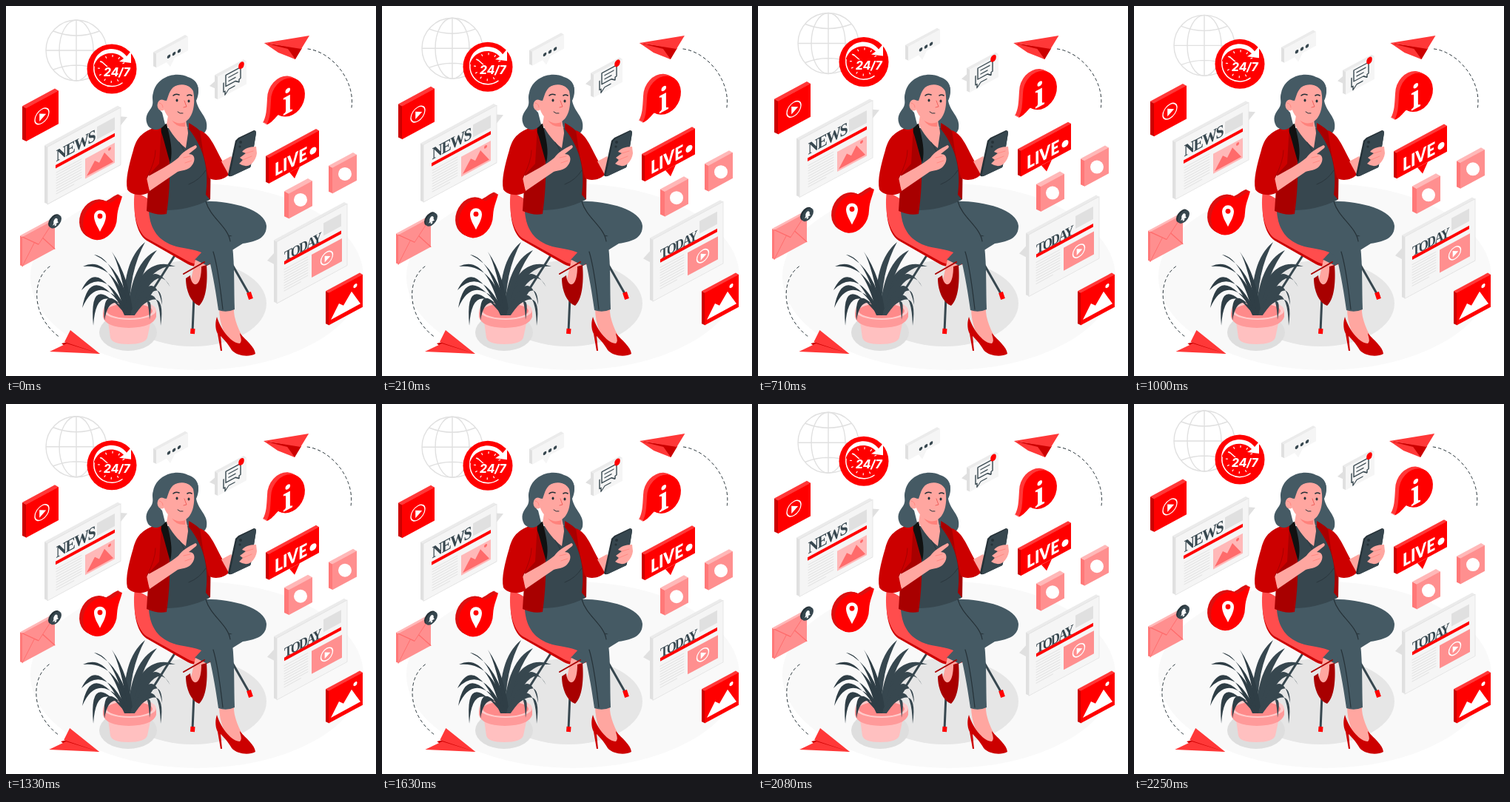
These frames come from a looping animation (500 by 500 pixels, 2290 ms). An HTML page:

```html
<!DOCTYPE html>
<html lang="en">
<head>
<meta charset="utf-8">
<style>
html, body { margin: 0; width: 100%; height: 100%; overflow: hidden; background: #fff; }
svg { display: block; width: 100vw; height: 100vh; }
</style>
</head>
<body>
<svg id="stage" viewBox="0 0 500 500"></svg>
<script>
const RED = '#f00', CHERRY = '#cc0000', DEEP = '#a80000', LIGHT = '#ff3838';
const PINK = '#ff8f8f', PALE = '#ffb8b8', ROSE = '#ff6b6b', SKIN = '#ffa6a0', BLUSH = '#ff827c';
const DARK = '#37474f', SLATE = '#455a64', INK = '#263238';
const WHITE = '#fff', MIST = '#f5f5f5', GREY = '#e0e0e0';
const SLOPE = .54;

const path = (fill, d) => `<path fill="${fill}" d="${d}"/>`;
const line = (color, width, d, extra = '') =>
  `<path fill="none" stroke="${color}" stroke-width="${width}" stroke-linecap="round" stroke-linejoin="round" ${extra} d="${d}"/>`;
const oval = (fill, x, y, rx, ry = rx) => `<ellipse fill="${fill}" cx="${x}" cy="${y}" rx="${rx}" ry="${ry}"/>`;
const move = (x, y, content) => `<g transform="translate(${x} ${y})">${content}</g>`;
const skew = (x, y, content) => `<g transform="matrix(1 ${-SLOPE} 0 1 ${x} ${y})">${content}</g>`;
const group = (name, content) => `<g class="${name}">${content}</g>`;
const word = (x, y, style, text) =>
  `<text transform="matrix(.866 ${-.866 * SLOPE} 0 1 ${x} ${y})" style="font:${style}">${text}</text>`;

// Upright slab seen at an angle; inner parts use the face's own coordinates.
function box(x, y, w, h, depth, [face, left, top], inner = '') {
  const lift = -2 * SLOPE * depth;
  return skew(x, y,
    path(left, `M.3 0L${-depth} ${lift}V${h + lift}L.3 ${h}Z`) +
    path(top, `M0 .3L${-depth} ${lift}H${w - depth}L${w} .3Z`) +
    path(face, `M0 0H${w}V${h}H0Z`) + inner);
}

function extrude(shape, depth, color) {
  let layers = '';
  for (let i = depth; i > 0; i--) layers += move(-i, -i * SLOPE, path(color, shape));
  return layers + path(RED, shape);
}

const circle = r => `M${-r} 0A${r} ${r} 0 1 1 ${r} 0A${r} ${r} 0 1 1 ${-r} 0Z`;
const play = (x, y, r) => move(x, y, line(WHITE, 1.4, circle(r)) +
  path(WHITE, `M${-r * .35} ${-r * .55}L${r * .6} 0L${-r * .35} ${r * .55}Z`));

function textLines(x, y, w, count) {
  let out = '';
  for (let i = 0; i < count; i++) out += line(GREY, 1, `M${x} ${y + i * 3.6}h${i == count - 1 ? w * .7 : w}`);
  return out;
}

const paper = [MIST, GREY, '#ebebeb'], redBox = [RED, CHERRY, LIGHT], pinkBox = [PINK, '#ff7878', PALE];
const frame = (w, h) => line(GREY, .8, `M0 0H${w}V${h}H0Z`);

function globe() {
  return `<g fill="none" stroke="${GREY}" stroke-width="1.4">
    <circle cx="95" cy="60" r="41"/><ellipse cx="95" cy="60" rx="23" ry="41"/>
    <path d="M95 19V101M54 60H136M64 34Q95 46 126 34M64 86Q95 74 126 86"/></g>`;
}

function clock() {
  return oval(RED, 143, 85, 33.5) +
    line(WHITE, 1.5, 'M157 104A24 24 0 0 1 119 82') +
    path(WHITE, 'M118 84C118 55 151 51 163 68L169 61L169 77L153 75L159 71C147 58 122 63 118 84Z') +
    `<circle cx="143" cy="85" r="17.5" fill="none" stroke="#fff" stroke-width="3" stroke-dasharray="1.2 7.96"/>` +
    line(WHITE, 1.5, 'M129 75L138 83') +
    path(RED, 'M132 82H172V96H130Z') +
    `<text x="132" y="95" fill="#fff" style="font:italic 800 15.5px Inter,sans-serif">24/7</text>`;
}

const headline = (size, spacing) =>
  `bold ${size}px 'Liberation Serif','Times New Roman',serif;letter-spacing:${spacing}px;fill:${DARK}`;

function newsPaper() {
  const photo = path(PALE, 'M51 43.5h40v27H51Z') + path(ROSE, 'M53 68L64 53L70 59L77 49L89 68Z') + oval(ROSE, 84, 48, 2);
  return path(GREY, 'M151 149L164 150L152 165Z') +
    box(56, 190.5, 99, 77.5, 4, paper,
      frame(99, 77.5) + path(GREY, 'M67 9h24v17H67Z') + path(RED, 'M11 30.5h80v4.5H11Z') +
      textLines(12, 41, 34, 9) + photo) +
    word(67.5, 210.5, headline(23, -1.7), 'NEWS');
}

function todayPaper() {
  return path(GREY, 'M363 333L353 344L366 351Z') +
    box(366, 318.5, 95, 83.5, 4, paper,
      frame(95, 83.5) + path(GREY, 'M63 9h24v17H63Z') + path(RED, 'M10 32h77v4.5H10Z') +
      textLines(10, 43, 32, 9) + path(PINK, 'M47 43h41v31H47Z') + play(67.5, 58.5, 8)) +
    word(376, 345, headline(19, -2), 'TODAY');
}

function roundBubbles() {
  const pin = path(WHITE, 'M0 15C-4 7-8 1-8-6A8 8 0 0 1 8-6C8 1 4 7 0 15Z') + oval(RED, 0, -6, 3.4);
  return move(127, 290, extrude('M23-4A22 27 25 1 1 13-23.6C20-27 25-32 30-33C28-24 24-18 23-4Z', 5, '#dc1010') + pin) +
    move(381, 123.5, extrude('M-23 4A22 27 25 1 1-13 23.6C-18 28-22 35-29 37C-24 28-24 20-23 4Z', 5, LIGHT)) +
    `<g fill="#fff" text-anchor="middle">${word(381, 145, "bold 44px 'Noto Serif',serif", 'i')}</g>`;
}

function cards() {
  const mountains = path(WHITE, 'M3 38L14 22L20 28L31 15L43 38Z') + oval(WHITE, 36, 10, 2.6);
  const dots = [17, 24, 31].map(x => oval(DARK, x, 13, 2.3)).join('');
  const chat = line(DARK, 1.4, 'M11 4H31V19H29V23L24 19H11Z') +
    line(DARK, 1.4, 'M8 13V25H10V30L15 25H23') + line(DARK, 1.4, 'M15 9H27M15 14H24');
  const bell = path(WHITE, 'M-4 3L-2.7 1V-2Q0-7 2.7-2V1L4 3Z') + oval(WHITE, 0, 4.2, 1.3);
  const floating = globe() + clock() +
    box(27, 138, 44, 45, 5, redBox, play(21.5, 22.5, 9.5)) +
    newsPaper() + roundBubbles() +
    box(22, 312, 44, 40, 3, pinkBox, line(ROSE, 1, 'M0 0L22 22L44 0M0 40L16 17M44 40L28 17')) +
    skew(67, 291.5, move(-2, -2.3, path(INK, circle(8))) + path(DARK, circle(8)) + bell) +
    box(203, 64.5, 43, 19, 4, paper, path(MIST, 'M14 19L19 28L25 19Z') + dots) +
    path(GREY, 'M283 101L275 108L286 113Z') +
    box(286, 95.5, 39, 31, 4, paper, chat + oval(RED, 32, 2, 3.8, 4.6)) +
    box(355, 205, 68, 35, 4, redBox, path(RED, 'M28 35L35 47L42 35Z') + oval(WHITE, 60, 23, 4.5)) +
    `<g fill="#fff">${word(363, 230.5, '900 24px Lato,sans-serif', 'LIVE')}</g>` +
    box(382, 253.5, 32, 34, 6, pinkBox) + oval(WHITE, 398, 262, 9) +
    box(441, 218.5, 33, 35, 5, pinkBox) + oval(WHITE, 458, 227, 9) +
    todayPaper();
  return box(436, 387.5, 46, 44, 4, redBox, mountains) + group('float', floating);
}

function planes() {
  const dash = 'stroke-dasharray="3.5 4"';
  return group('drift',
    line(INK, 1, 'M408 58C440 62 472 100 467 137', dash) +
    path(CHERRY, 'M349 50L400 57L391 72Z') + path(LIGHT, 'M349 50L410 40L399 58ZM349 50L381 58L391 72L368 63Z') +
    line(INK, 1, 'M59 352C34 370 34 420 73 448', dash) +
    path(CHERRY, 'M127 470L91 452L75 456L84 463Z') + path(LIGHT, 'M127 470L87 438L79 454ZM127 470L59 467L82 456Z'));
}

function chair() {
  return line(DARK, 3, 'M230 334L188 400M298 336L330 392M256 345L252 440') +
    line(RED, 6, 'M328 387L331 396M252.5 436L252 443', 'style="stroke-linecap:butt"') +
    path(CHERRY, 'M175 260C171 285 178 311 192 318L246 349C256 354 270 353 280 347L312 325L300 290Z') +
    path('#ff4d4d', 'M174 250C170 280 178 308 192 315L246 345C256 351 270 350 280 344L312 322L300 290L200 265Z');
}

function legs() {
  return path(SLATE, 'M262 264C300 262 350 274 352 297C352 313 340 318 320 321L270 352L255 343L290 305L240 300Z') +
    path(INK, 'M270 290Q285 306 306 311L293 312Q280 304 270 290Z') +
    path(SKIN, 'M256 343L270 350C266 365 270 385 262 398L248 378Z') +
    line(DEEP, 2, 'M268 346L240 362') +
    path(DEEP, 'M271 350C273 375 270 397 261 405C250 401 243 385 243 368L249 364C250 380 264 384 264 352Z') +
    path(SKIN, 'M288 408L308 408C307 422 315 440 325 456L308 462C296 448 288 430 288 408Z') +
    path(CHERRY, 'M285 420C291 440 306 456 316 456C320 452 316 446 316 442C324 452 336 460 337 470C328 475 312 473 305 465C300 456 293 449 290 446L292 466H290L286 443C282 435 283 426 285 420Z') +
    path(SLATE, 'M193 278C195 302 206 318 230 325C254 330 271 331 275 344C280 365 284 390 287 411Q298 415 309 410C308 385 309 350 306 325C304 305 285 285 268 262Z') +
    line(INK, 1.2, 'M270 264C276 286 300 298 303 318M280 332C287 355 290 385 293 410');
}

function torso() {
  return path(DARK, 'M214 165L248 165C264 178 274 190 274 205L275 262C255 272 235 276 216 276Z') +
    path(SKIN, 'M220 142L243 150C243 160 246 165 246 172L243 192C232 184 222 170 217 160Z') +
    path(BLUSH, 'M224 154Q232 161 242 157L242 163Q230 164 224 154Z') +
    path(DEEP, 'M247 158C262 166 274 178 277 200L276 262L270 255C274 225 270 195 247 166Z') +
    path(CHERRY, 'M262 168C275 172 282 190 291 207L302 227C294 236 280 237 274 232L266 195Z') +
    path(DEEP, 'M213 160C222 190 224 230 217 281C208 283 200 281 190 277L195 200Z') +
    path('#111', 'M207 163L217 159C222 180 226 195 222 212C217 198 214 180 207 163Z') +
    line(INK, .8, 'M234 184Q242 195 245 210M247 241Q262 235 270 222');
}

function arms() {
  return path(SKIN, 'M291 210L304 203L312 220L301 228Z') +
    path(INK, 'M314 178L335 168Q338 168 338 171L331 215Q331 218 328 219L304 230Q300 231 300 228L310 182Z') +
    path(DARK, 'M316 179L336 169Q338 169 338 172L331 215Q331 218 328 219L305 230Q302 230 303 227L312 183Z') +
    oval(INK, 317, 184, 2) + oval(INK, 316, 190, 1.6) +
    path(SKIN, 'M338 190C328 190 322 193 319 197L324 199L316 205L320 208L315 213Q324 219 331 214Q338 208 339 199Z') +
    line(BLUSH, .8, 'M324 199L334 196M320 208L332 203') +
    path(SKIN, 'M188 233C205 222 222 215 233 205C238 198 246 193 256 188Q259 189 257 192L247 200C257 200 256 211 250 217C245 222 238 222 232 224L194 250Z') +
    line(BLUSH, .8, 'M240 205L249 203M242 212L251 209') +
    path(CHERRY, 'M210 161C185 169 177 176 172 195C166 215 161 235 164 248C170 257 188 257 194 251L190 232L207 213Z') +
    line(DEEP, 1, 'M202 195Q202 210 190 233');
}

function head() {
  return path(SKIN, 'M209 118C214 104 247 100 253 115C256 130 254 151 241 157C230 160 218 154 213 138Z') +
    path(SLATE, 'M232 107C222 109 220 120 217 128L209 127C204 131 206 140 211 144L215 160C206 171 196 167 192 162C187 152 190 146 196 138C201 130 196 126 199 117C204 95 230 88 246 96C262 101 262 116 257 124C254 112 246 104 232 107Z') +
    oval(SKIN, 210.5, 134, 6, 7.5) + line(BLUSH, .8, 'M207 131Q212 132 212 137') +
    oval(INK, 231, 127.5, 1.5, 2) + oval(INK, 247, 128.5, 1.5, 2) +
    line(INK, 1.6, 'M226 121Q229 118 234 120M245 121Q248 119 251 121') +
    line('#f0605c', 1, 'M241 128L244 136L240 137') +
    line(INK, 1, 'M232 143Q235 146 239 145');
}

const backHair = path(SLATE, 'M248 98C262 102 262 118 257 128C260 144 274 150 271 166C268 176 258 176 250 171C246 165 241 160 241 156L222 150L225 110Z');

function plant() {
  const blade = ([x, y, cx, cy], i) => path(i % 2 ? DARK : '#2f3e46',
    `M${160 + i * .6} 418Q${cx - 5} ${cy - 6} ${x} ${y}Q${cx + 6} ${cy + 7} ${166 + i * .6} 418Z`);
  const blades = [
    [102, 384, 130, 342], [188, 319, 160, 352], [104, 352, 146, 340], [229, 352, 186, 340],
    [118, 432, 116, 360], [209, 432, 212, 362], [119, 336, 152, 346], [204, 330, 174, 352],
    [103, 408, 120, 348], [222, 380, 198, 336], [143, 332, 160, 358], [211, 404, 204, 352],
    [133, 425, 134, 374], [194, 424, 196, 370]
  ];
  return path('#ffc0c0', 'M137 420L141 448Q143 457 165 457Q188 457 191 448L197 420Z') +
    path('#ff9a9a', 'M131 411V420Q134 434 166 435Q199 434 203 420V411Z') +
    oval('#ffcaca', 167, 411, 36, 13) + oval('#ff8a8a', 167, 412, 31, 10) +
    blades.map(blade).join('');
}

document.getElementById('stage').innerHTML =
  oval('#f9f9f9', 258, 366, 225, 126) + oval('#e6e6e6', 252, 402, 100, 58) + oval('#dedede', 165, 441, 39, 25) +
  cards() + planes() + chair() + backHair + legs() + torso() + arms() + head() + plant();

const float = document.querySelector('.float'), drift = document.querySelector('.drift');
const LOOP = 2290, SWING = 1500;

function draw() {
  const phase = performance.now() % LOOP % SWING / SWING;
  const rise = 1 - Math.abs(2 * phase - 1);
  float.setAttribute('transform', `translate(0 ${-10 * rise})`);
  drift.setAttribute('transform', `translate(${-3.8 * rise} 0)`);
  requestAnimationFrame(draw);
}
draw();
</script>
</body>
</html>
```
